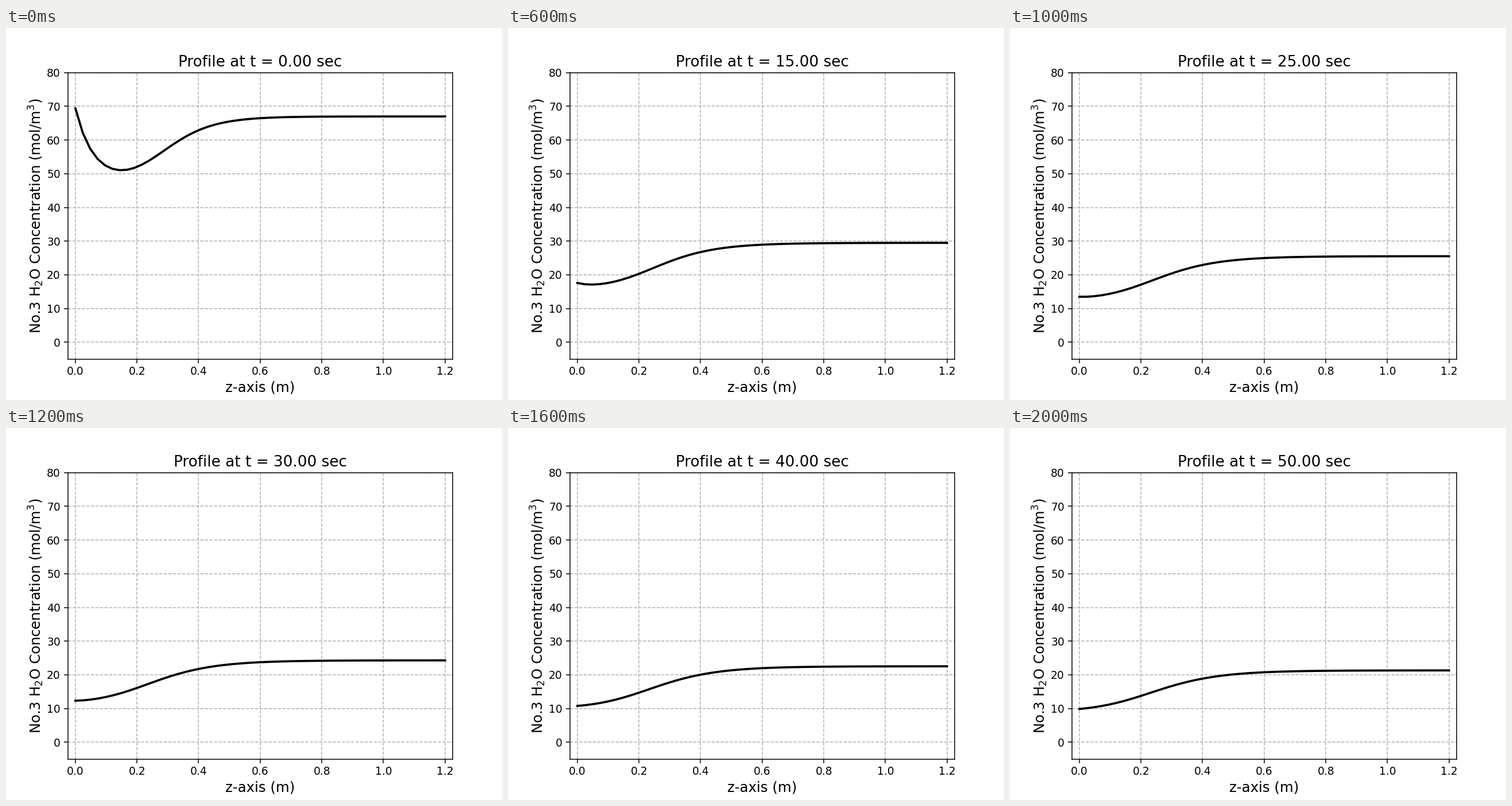
Animation of 864x648 px, one loop 2100 ms. Source, as a matplotlib script:

```python
import numpy as np
import matplotlib.pyplot as plt
from matplotlib.animation import FuncAnimation

FRAMES, INTERVAL, DT = 21, 100, 2.5
END = (FRAMES - 1) * DT


def decay(t):
    """Power-law fall from 1 at t = 0."""
    return (1 + t / 2.05) ** -0.523


def sigmoid_drop(z, floor, gain, power):
    """Generalised logistic: high at the inlet, zero far downstream."""
    return (floor + gain * np.exp(11 * z)) ** -power


z = np.linspace(0, 1.2, 51)
early = sigmoid_drop(z, 0.0313, 0.00261, 1.0)
late = sigmoid_drop(z, 0.0276, 0.0031, 0.7)
inlet = 31.9 * np.exp(-12.6 * z + 30 * z**2 - 120 * z**3)


def profile(t):
    """Outlet level, minus the drop towards the inlet, plus the inlet peak."""
    s = decay(t)
    q = (s - decay(END)) / (1 - decay(END))
    outlet = 11 + 56 * s
    drop = late + q * (early - late)
    return outlet - drop + inlet * q**1.42


plt.rcParams["font.family"] = "DejaVu Sans"
fig, ax = plt.subplots(figsize=(6.4, 4.8), dpi=135)
line, = ax.plot(z, profile(0), "k", lw=2)
ax.set_xlim(-0.024, 1.224)
ax.set_ylim(-5, 80)
ax.tick_params(axis="x", pad=3)
ax.set_xlabel("z-axis (m)", fontsize=13, labelpad=3.5)
ax.set_ylabel("No.3 H$_2$O Concentration (mol/m$^3$)", fontsize=13, labelpad=1.7)
ax.grid(linestyle="--")
title = ax.set_title("", fontsize=14)


def update(i):
    t = i * DT
    line.set_ydata(profile(t))
    title.set_text(f"Profile at t = {t:.2f} sec")
    return line, title


anim = FuncAnimation(fig, update, frames=FRAMES, interval=INTERVAL, repeat=True)
plt.show()
```
